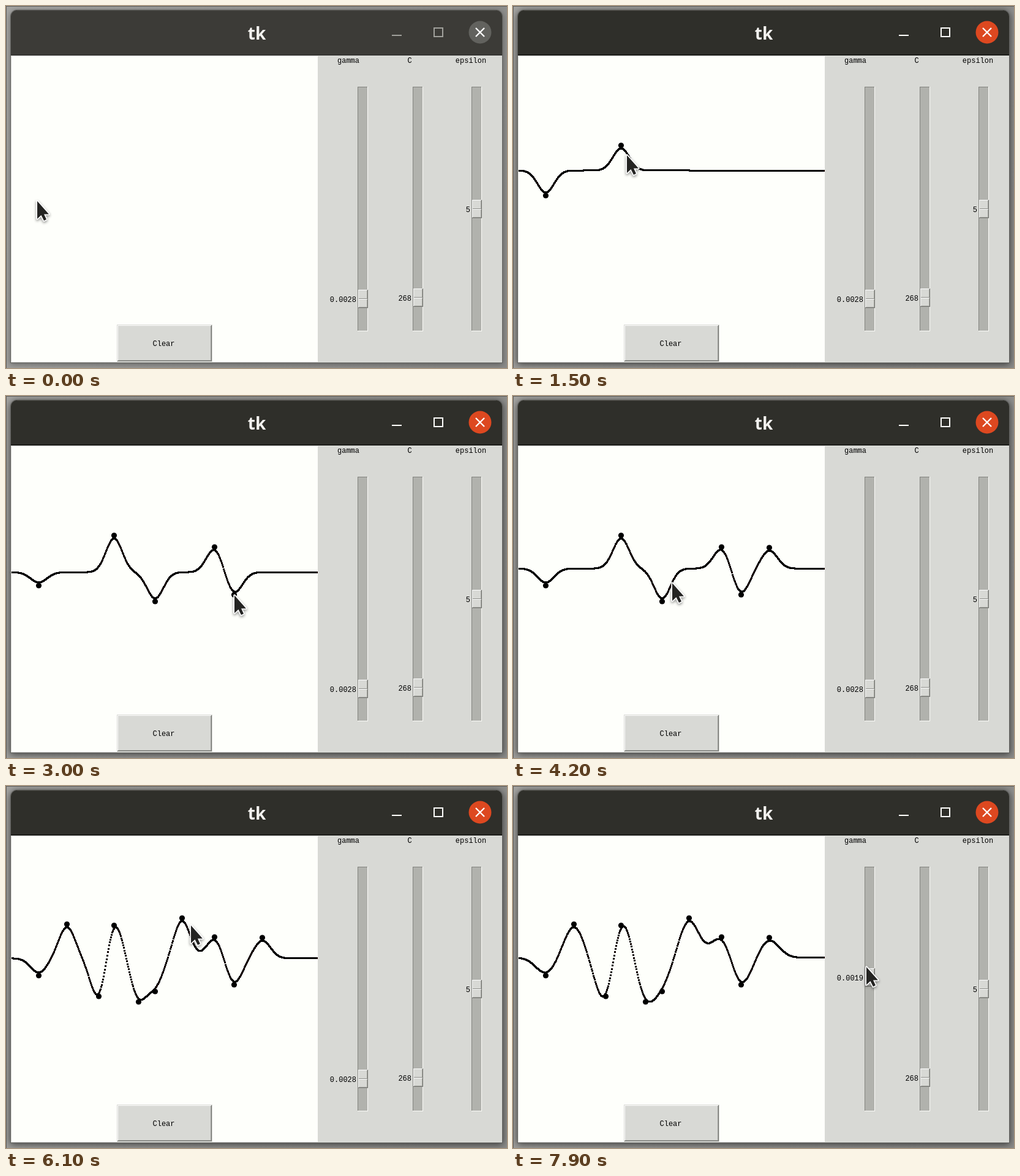
An HTML page with a canvas that plays this animation: 818x592 px, repeating every 8000 ms.

```html
<!DOCTYPE html>
<html lang="en">
<head>
<meta charset="utf-8">
<title>Support vector regression demo</title>
<style>
html, body { margin: 0; width: 100%; height: 100%; overflow: hidden; }
canvas { display: block; }
</style>
</head>
<body>
<canvas id="stage" width="818" height="592"></canvas>
<script>
const ctx = document.getElementById('stage').getContext('2d');
const LOOP = 8000, STEP = 100;
const C = 268, EPSILON = 5;
const PANEL = '#d8d9d5';
const MONO = '12px "Liberation Mono", monospace';

// Clicks add a sample; rests only guide the pointer. Each is [time, x, y].
const clicks = [
  [300, 53, 310], [1200, 176, 228], [1800, 243, 336], [2400, 340, 247], [3000, 372, 325],
  [3700, 418, 248], [4500, 151, 344], [5100, 99, 226], [5500, 216, 353], [5900, 287, 216]
];
const rests = [[0, 50, 318], [4900, 99, 226], [6100, 301, 227], [6300, 436, 301], [6800, 581, 480]];
const stops = [...clicks, ...rests].sort((a, b) => a[0] - b[0]);

const clamp = (v, lo, hi) => Math.min(hi, Math.max(lo, v));
const lerp = (a, b, u) => a + (b - a) * u;
const smooth = u => u * u * (3 - 2 * u);
const mix = (a, b, u) => `rgb(${a.map((v, i) => Math.round(lerp(v, b[i], u)))})`;
const dragProgress = t => clamp((t - 6900) / 900, 0, 1);

// The pointer waits, then reaches each stop on time; longer ways take longer.
function pointerAt(t) {
  const next = stops.findIndex(stop => stop[0] > t);
  if (next < 0) {
    const [, x, y] = stops.at(-1), drag = dragProgress(t);
    return [x - 5 * drag, y - 185 * drag];
  }
  const [t0, x0, y0] = stops[next - 1], [t1, x1, y1] = stops[next];
  const travel = Math.min(t1 - t0, 150 + 1.9 * Math.hypot(x1 - x0, y1 - y0));
  const u = smooth(clamp(1 - (t1 - t) / travel, 0, 1));
  return [lerp(x0, x1, u), lerp(y0, y1, u)];
}

// Epsilon-insensitive regression with an RBF kernel, solved pair by pair.
function fit(points, gamma) {
  const n = points.length;
  const kernel = (a, b) => Math.exp(-gamma * (a - b) ** 2);
  const K = points.map(p => points.map(q => kernel(p[0], q[0])));
  const beta = new Array(n).fill(0);
  const residual = points.map(p => -p[1]);
  for (let sweep = 0; sweep < 300; sweep++) {
    for (let i = 0; i < n; i++) for (let j = i + 1; j < n; j++) {
      const curvature = 2 - 2 * K[i][j], slope = residual[i] - residual[j];
      const lo = Math.max(-C - beta[i], beta[j] - C);
      const hi = Math.min(C - beta[i], beta[j] + C);
      const cost = d => curvature * d * d / 2 + slope * d +
        EPSILON * (Math.abs(beta[i] + d) + Math.abs(beta[j] - d));
      const candidates = [-beta[i], beta[j],
        ...[-2, 0, 2].map(s => -(slope + s * EPSILON) / curvature)];
      let best = 0;
      for (const c of candidates) {
        const d = clamp(c, lo, hi);
        if (cost(d) < cost(best)) best = d;
      }
      beta[i] += best;
      beta[j] -= best;
      for (let k = 0; k < n; k++) residual[k] += best * (K[i][k] - K[j][k]);
    }
  }
  let sum = 0, free = 0;
  beta.forEach((b, i) => {
    const size = Math.abs(b);
    if (size < 1e-6 || size > C - 1e-6) return;
    sum -= residual[i] + EPSILON * Math.sign(b);
    free++;
  });
  const bias = free ? Math.round(sum / free * 1e6) / 1e6 : points[0][1];
  return x => points.reduce((f, p, i) => f + beta[i] * kernel(x, p[0]), bias);
}

const models = {};
function model(count, gamma) {
  return models[count + ':' + gamma] ??=
    fit(clicks.slice(0, count).map(c => c.slice(1)), gamma / 10000);
}

function rect(x, y, w, h, color) {
  ctx.fillStyle = color;
  ctx.fillRect(x, y, w, h);
}

function bevel(x, y, w, h, fill, light, dark) {
  rect(x, y, w, h, dark);
  rect(x, y, w - 1, h - 1, light);
  rect(x + 1, y + 1, w - 2, h - 2, fill);
}

function raised(x, y, w, h) {
  bevel(x, y, w, h, PANEL, '#fff', '#757672');
  rect(x + 1, y + h - 2, w - 2, 1, '#a0a19c');
  rect(x + w - 2, y + 1, 1, h - 2, '#a0a19c');
}

function text(str, x, y, align, font = MONO, color = '#000') {
  ctx.font = font;
  ctx.textAlign = align;
  ctx.fillStyle = color;
  ctx.fillText(str, x, y);
}

function disc(x, y, r, color) {
  ctx.fillStyle = color;
  ctx.beginPath();
  ctx.arc(x, y, r, 0, Math.PI * 2);
  ctx.fill();
}

function strokePath(d, color, width) {
  ctx.strokeStyle = color;
  ctx.lineWidth = width;
  ctx.stroke(new Path2D(d));
}

function drawDesktop(focus) {
  const shade = ctx.createLinearGradient(0, 0, 818, 300);
  shade.addColorStop(0, '#a3a3a1');
  shade.addColorStop(1, '#8b8b89');
  rect(0, 0, 818, 592, shade);
  ctx.save();
  ctx.shadowColor = `rgba(0,0,0,${0.35 + 0.25 * focus})`;
  ctx.shadowBlur = 8 + 4 * focus;
  ctx.shadowOffsetY = 2;
  ctx.fillStyle = '#62625f';
  ctx.beginPath();
  ctx.roundRect(7, 6, 804, 578, [11, 11, 0, 0]);
  ctx.fill();
  ctx.restore();
  rect(0, 0, 818, 1, '#5c5c5a');
  rect(0, 0, 1, 592, '#5c5c5a');
}

function drawTitleBar(focus) {
  ctx.fillStyle = mix([60, 59, 55], [47, 47, 42], focus);
  ctx.beginPath();
  ctx.roundRect(8, 7, 802, 74, [10, 10, 0, 0]);
  ctx.fill();
  rect(18, 7, 782, 1, mix([74, 73, 69], [70, 69, 64], focus));
  rect(8, 79, 802, 2, mix([54, 53, 50], [29, 29, 26], focus));
  text('tk', 409.5, 55, 'center', 'bold 28px "Noto Sans", sans-serif', '#f4f3f0');
  const icon = mix([160, 160, 155], [255, 255, 252], focus);
  rect(630, 47, 16, 2, icon);
  strokePath('M699 36h14v14h-14z', icon, 2);
  disc(774, 43, 18.5, mix([98, 98, 94], [221, 72, 32], focus));
  strokePath('M767 36 781 50M781 36 767 50', '#fff', 2.4);
}

function drawSlider(x, center, value) {
  bevel(x, 132, 17, 400, '#b1b2ad', '#83847f', '#fbfbf8');
  const top = Math.round(center) - 15;
  raised(x + 1, top, 16, 30);
  rect(x + 2, top + 14, 14, 1, '#8a8b86');
  rect(x + 2, top + 15, 14, 1, '#fff');
  text(value, x - 2, top + 20, 'right');
}

function drawPanel(gamma) {
  rect(509, 81, 301, 502, PANEL);
  ['gamma', 'C', 'epsilon'].forEach((name, i) => text(name, 559 + 100 * i, 93, 'center'));
  drawSlider(574, 147 + (gamma - 10) / 20 * 369, (gamma / 10000).toFixed(4));
  drawSlider(664, 477, String(C));
  drawSlider(760, 332, String(EPSILON));
}

function drawPlot(count, gamma) {
  rect(8, 81, 501, 502, PANEL);
  rect(9, 82, 500, 500, '#fefffb');
  if (count) {
    const predict = model(count, gamma);
    for (let x = 10; x < 509; x++) {
      const y = Math.floor(predict(x));
      rect(x - 1, y - 1, 3, 3, '#000');
      rect(x, y, 1, 1, '#500000');
    }
  }
  for (const [, x, y] of clicks.slice(0, count)) disc(x + 0.5, y, 4.6, '#000');
  rect(181, 521, 156, 61, PANEL);
  raised(182, 522, 154, 59);
  text('Clear', 257.5, 556, 'center');
}

const arrow = new Path2D('M1 2V31L7.5 25 12 34 16 32 12 23.5H20Z');
function drawPointer(x, y) {
  ctx.save();
  ctx.translate(Math.round(x), Math.round(y) - 1);
  ctx.lineJoin = 'round';
  ctx.lineWidth = 3.4;
  ctx.strokeStyle = '#fff';
  ctx.shadowColor = 'rgba(0,0,0,.45)';
  ctx.shadowBlur = 4;
  ctx.shadowOffsetY = 2;
  ctx.stroke(arrow);
  ctx.shadowColor = 'transparent';
  ctx.fillStyle = '#242422';
  ctx.fill(arrow);
  ctx.restore();
}

function draw(now) {
  const t = Math.floor((now % LOOP) / STEP) * STEP;
  const focus = clamp((t - 200) / 300, 0, 1);
  const count = clicks.filter(c => c[0] <= t).length;
  const gamma = Math.round(28 - 9 * dragProgress(t));
  drawDesktop(focus);
  drawTitleBar(focus);
  drawPlot(count, gamma);
  drawPanel(gamma);
  drawPointer(...pointerAt(t));
}

const start = performance.now();
function frame() {
  draw(performance.now() - start);
  requestAnimationFrame(frame);
}
frame();
</script>
</body>
</html>
```
